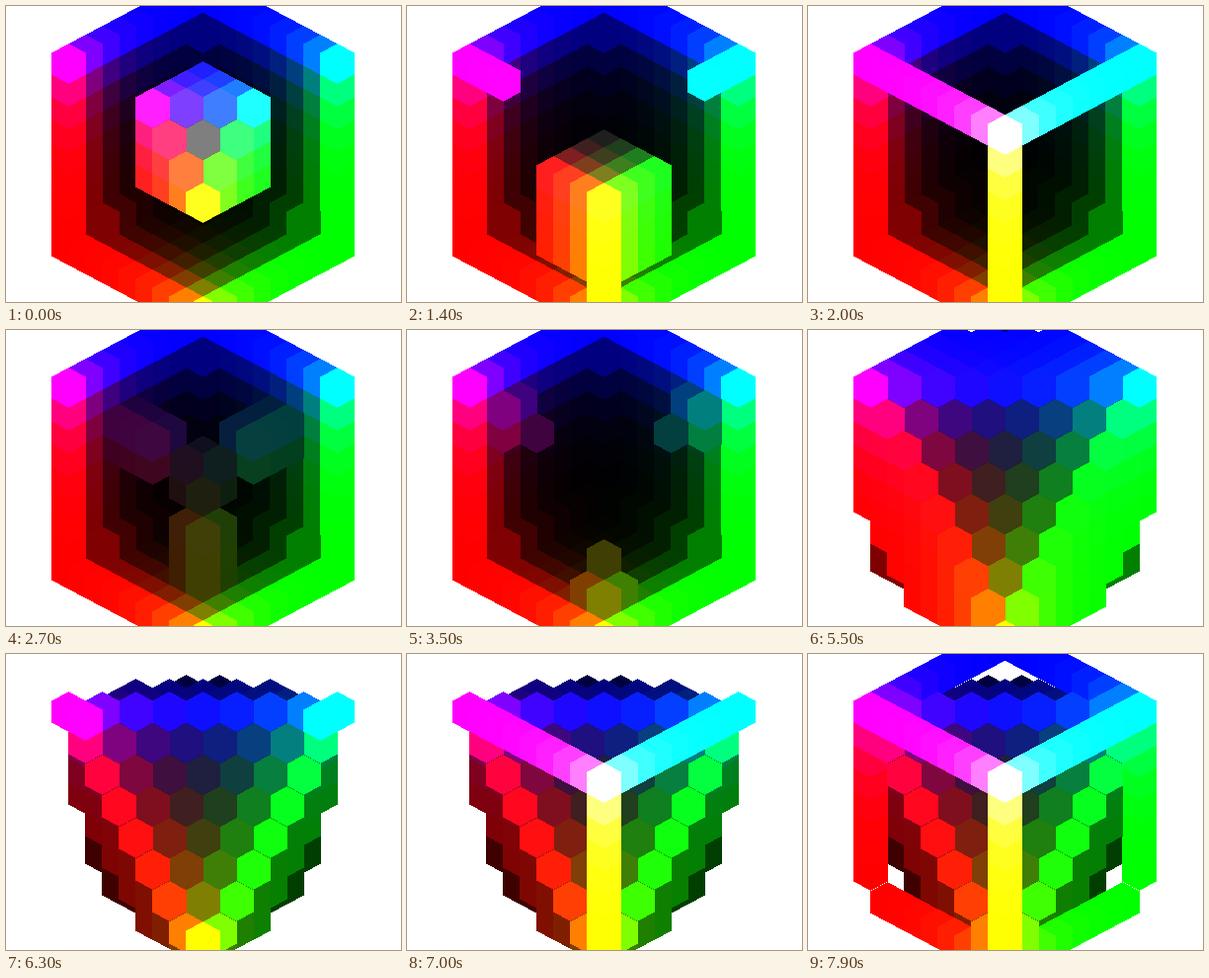
Animation of 400 by 300 pixels, one loop 8 s. Source, as an HTML page with a canvas:

```html
<!DOCTYPE html>
<html lang="en">
<head>
<meta charset="utf-8">
<title>RGB voxel cube</title>
<style>
html, body { margin: 0; width: 100%; height: 100%; overflow: hidden; background: #fff; }
canvas { display: block; }
</style>
</head>
<body>
<canvas id="stage" width="400" height="300"></canvas>
<script>
const ctx = document.getElementById('stage').getContext('2d');
const MAX = 8, STEP_MS = 100, STEPS = 80;
const DX = 17, DY = 9, RISE = 23;

const clamp = (v, lo, hi) => Math.min(hi, Math.max(lo, v));
const level = i => 2 ** i - 1;

// All cells, far to near along the view diagonal.
const cells = [];
for (let r = 0; r <= MAX; r++)
  for (let g = 0; g <= MAX; g++)
    for (let b = 0; b <= MAX; b++) {
      const sorted = [r, g, b].sort((p, q) => p - q);
      cells.push({
        r, g, b,
        sum: r + g + b,
        low: sorted[0], mid: sorted[1], high: sorted[2],
        x: 199.5 + (g - r) * DX,
        y: 170.5 + (r + g) * DY - b * RISE,
        color: `rgb(${level(r)},${level(g)},${level(b)})`
      });
    }
cells.sort((p, q) => p.sum - q.sum);

// Edges that meet at the white corner, grown inward from the secondary colours.
const onFrontEdge = (c, length) => c.mid === MAX && c.low <= length;

// Outline edges, grown from the secondary colours to the primary ones.
const onOutline = (c, length) =>
  c.high === MAX && c.low === 0 && c.mid >= MAX - length;

// Thin rods along the three axes at the black corner.
const onRod = c => c.mid <= 1 && c.high < MAX;

// Block at the white corner: completed first, then sliding down.
function inBlock(c, step) {
  const drop = Math.max(0, step - 11);
  const z = c.b + drop;
  return c.r >= 5 && c.g >= 5 && z >= 5 && z <= MAX &&
    c.sum + drop <= 21 + Math.min(step, 3);
}

// Three bars pointing outward, with a small block between them.
function inBars(c, step) {
  if (step >= 31) return c.mid >= 6 && c.high <= 7 && c.low + c.high <= MAX;
  const center = c.low >= 4 && c.high <= 5 && c.sum <= 14;
  return center || c.mid >= 5 && c.high <= 6 && c.low <= Math.min(3, step - 24);
}

// Volume growing from black up to the magenta-cyan-yellow plane.
const inFill = (c, step) =>
  c.sum <= 16 && (c.low === 0 || step >= 37 && c.sum + c.high <= step - 26);

// Wedges removed at the red, green and blue corners.
const isCut = (c, amount) =>
  c.low + c.mid + Math.ceil(3.5 * (MAX - c.high)) < amount;

function isVisible(c, step) {
  if (step >= 63 && onFrontEdge(c, step - 62)) return true;
  if (step >= 73 && onOutline(c, step - 72)) return true;
  if (inFill(c, step) || onRod(c)) return !isCut(c, clamp(step - 52, 0, MAX));
  if (step <= 20 && inBlock(c, step)) return true;
  if (step >= 12 && step <= 20 && onFrontEdge(c, step - 12)) return true;
  return step >= 25 && step <= 50 && inBars(c, step);
}

// Hexagon with crisp stepped edges: each pass is wider and shorter.
function drawCell({ x, y, color }) {
  const height = RISE + 2 * DY;
  ctx.fillStyle = color;
  for (let i = 0; i <= DY; i++) {
    const half = Math.round(DX * i / DY) + 0.5;
    ctx.fillRect(x - half, y - height / 2 + i, 2 * half, height - 2 * i);
  }
}

function draw(step) {
  ctx.fillStyle = '#fff';
  ctx.fillRect(0, 0, 400, 300);
  for (const c of cells) if (isVisible(c, step)) drawCell(c);
}

let shown = -1;
const start = performance.now();
function tick() {
  const step = Math.floor((performance.now() - start) / STEP_MS) % STEPS;
  if (step !== shown) draw(shown = step);
  requestAnimationFrame(tick);
}
tick();
</script>
</body>
</html>
```
